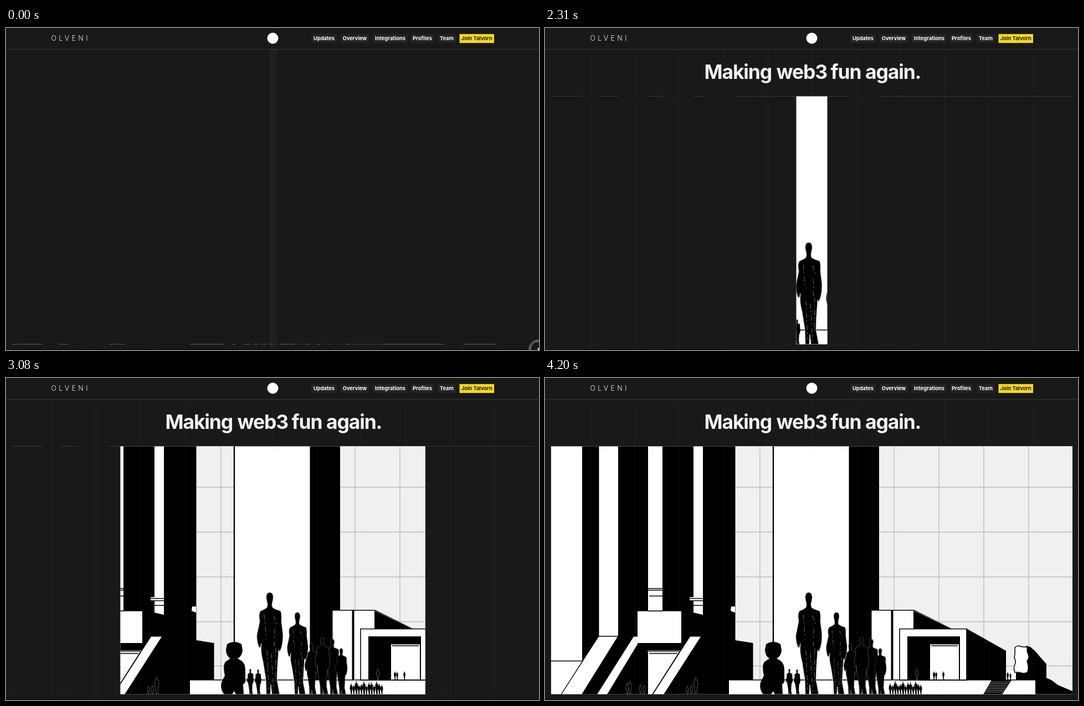
Recreate the animation shown at these times as an HTML page. Size 962 px wide and 582 px high, loop 4270 ms.

```html
<!DOCTYPE html>
<html lang="en">
<head>
<meta charset="utf-8">
<title>Making web3 fun again</title>
<style>
  html, body { margin: 0; width: 100%; height: 100%; overflow: hidden; background: #191919; }
  svg { display: block; width: 962px; height: 582px; font-family: Inter, sans-serif; }
  .nav { font-size: 9.3px; font-weight: 650; fill: #fff; text-anchor: middle; }
  .title { font-size: 35.5px; font-weight: 660; letter-spacing: -1.15px; fill: #f2f2f2; }
  .mark { font-size: 12.4px; font-weight: 300; letter-spacing: 4.4px; fill: #eee; }
</style>
</head>
<body>
<svg viewBox="0 0 962 582">
  <defs>
    <clipPath id="reveal"><rect id="window" y="123.5" height="448"/></clipPath>
    <clipPath id="topRow"><rect x="11" y="123" width="941" height="1"/></clipPath>
    <clipPath id="bottomRow"><rect x="11" y="571" width="941" height="1"/></clipPath>

    <path id="person" d="M0 0C5 0 7 5 6 12L4 22L5 27Q10 31 19 33Q22 36 21 52L24 76Q24 96 18 107L16 104L14 132L13 157L18 184H4L2 166L1 184H-6L-7 157L-12 125Q-17 108-15 92L-17 100L-20 98Q-24 85-23 76L-18 52Q-21 38-16 33Q-9 31-5 27L-4 22L-6 12C-7 5-5 0 0 0Z"/>
    <path id="scratches" fill="none" stroke="#888" stroke-width=".8" stroke-dasharray="9 4 3 6"
      d="M-10 40L-6 85M7 42L13 60M9 66L8 100M-5 105L-2 175M3 110L7 178M11 100L10 160"/>

    <g id="scene">
      <path fill="#fff" d="M11 123H952V572H11Z"/>
      <!-- tiled walls -->
      <path fill="#f0f0f0" d="M343 123H411V546H343ZM603 123H952V572H603Z"/>
      <path fill="none" stroke="#bcbcbc" stroke-width="1.4"
        d="M388 123V546M630 123V546M711 123V546M792 123V546M873 123V546M343 197.5H411M343 278.5H411M343 359.5H411M343 440.5H411M343 520.5H411M603 197.5H952M603 278.5H952M603 359.5H952M603 440.5H952M603 520.5H952"/>
      <!-- pillars and the dark mass on the left -->
      <path d="M67 123H97.500V466H132V123H186V421H212V123H268V424L285 428V123H343.500V474L375.500 479V546H332V572H29L67 512ZM410.800 123H413.200V546H410.800ZM548.500 123H603V546H548.500Z"/>
      <path fill="#fff" d="M97 467.500H131L66 572H29.500ZM160 467.500H167V481L112 572H94ZM167 421.500H246V479H167ZM186 495H242L193 572H186ZM262 467.500H281L214 572H195ZM261 396H285V411H268V402H261ZM343 413H336L335 421L343 424Z"/>
      <path fill="none" stroke="#fff" d="M185 493.500H244"/>
      <path fill="none" stroke="#000" stroke-width="1.3" d="M11 511.500H68L29 572M186 380.500H212M186 383.500H212M188 394H212M186 421H212M261 398.500H285M261 402.500H285M268 411H285M188 498H239"/>
      <!-- right-hand buildings -->
      <path fill="#fff" d="M332 546H885V572H332ZM589.500 420H665V546H589.500ZM832 530H850V572H832Z"/>
      <path d="M589 419H666L735 453H761L832 493V546H761V466L665 420.500H589ZM624.500 420H628.500V546H624.500ZM665 420V453H735Z"/>
      <path fill="#fff" stroke="#000" stroke-width="1.6" d="M640 546V453.500H761V546Z"/>
      <path d="M654 467H749V546H654Z"/>
      <path fill="#fff" d="M695 481.500H747V546H695Z"/>
      <path fill="none" stroke="#000" d="M697 484H745M332 545.800H890" stroke-width="1.4"/>
      <path d="M806 546H842L825 572H791Z"/>
      <path fill="none" stroke="#aaa" stroke-width=".8" d="M805 549.500H838M803 552.500H836M801 555.500H834M799 558.500H832M798 561.500H831M796 564.500H829M794 567.500H827"/>
      <path d="M868 484L876 486L884 493L891 501L905 517V542L914 546L926 555L952 566V572H885V546H850V533H868Z"/>
      <path fill="#fff" stroke="#000" stroke-width="1.5" d="M848 487Q853 483 858 485T871 486Q869 493 872 499T870 512Q874 521 871 532Q865 535 859 533T848 532Q845 524 848 518T847 506Q849 496 848 487Z"/>
      <path fill="#fff" d="M854 547H884V572H854Z"/>
      <g id="people"></g>
      <path d="M399 481Q412 473 425 481L427 492Q426 503 418 507L425 511Q432 516 432 528V550L428 554L429 572H415L412 566L408 572H394Q386 562 389 550L395 538Q391 520 396 513L405 507Q397 502 397 491Z"/>
    </g>
  </defs>

  <use id="topEdge" href="#scene" clip-path="url(#topRow)"/>
  <use id="bottomEdge" href="#scene" clip-path="url(#bottomRow)"/>
  <use href="#scene" clip-path="url(#reveal)"/>
  <g id="columns" fill="#e6e6e6"></g>

  <path fill="#363636" d="M0 38H962V39H0Z"/>
  <path fill="#101010" d="M0 580H962V582H0Z"/>
  <text class="mark" x="81.500" y="23">OLVENI</text>
  <circle cx="481.500" cy="18.500" r="10" fill="#fff"/>
  <g id="nav" class="nav"></g>
  <text id="title" class="title" y="91.500"><tspan x="287.500">Making</tspan><tspan x="417.500">web3</tspan><tspan x="515.500">fun</tspan><tspan x="578">again.</tspan></text>

  <g id="ring" fill="none">
    <circle cx="960" cy="580" r="16" stroke="#999"/>
    <circle cx="960" cy="580" r="13.500" stroke="#ccc"/>
  </g>
  <path id="pointer" fill="#fff" d="M959 578L964 580L961 583Z"/>
</svg>

<script>
const $ = id => document.getElementById(id);
const LOOP = 4270, TICK = 70, CENTER = 481.5;

function add(parent, name, attrs, text = '') {
  const node = document.createElementNS('http://www.w3.org/2000/svg', name);
  for (const key in attrs) node.setAttribute(key, attrs[key]);
  node.textContent = text;
  parent.append(node);
  return node;
}

function person(x, top, height, outline = 'none', scratched = false) {
  const scale = height / 184;
  const transform = `translate(${x} ${top}) scale(${scale})`;
  add($('people'), 'use', { href: '#person', transform, stroke: outline, 'stroke-width': .8 / scale });
  if (scratched) add($('people'), 'use', { href: '#scratches', transform });
}

[[551, 480, 92], [589, 472, 100], [571, 468, 104]].forEach(p => person(...p, '#555'));
person(605, 489, 83, '#333');
person(476, 387.5, 184.5, '#ddd', true);
person(526, 423.5, 148.5, '#ddd', true);
[[441, 526, 46], [455, 527, 45], [702, 530, 15], [706, 531, 14], [719, 530, 15],
 [835, 531, 15], [840, 533, 13], [852, 532, 14], [862, 533, 13]].forEach(p => person(...p));
[[671, 526, 20], [148, 551, 21], [153, 548, 24], [172, 554, 18], [179, 556, 16],
 [257, 557, 15], [264, 556, 16], [272, 541, 31]].forEach(p => person(...p, '#666'));
for (let i = 0; i < 13; i++) {
  const top = 552 + 4 * Math.sin(i * 2.3);
  person(623 + i * 4.6, top, 572 - top);
}

[['Updates', 551, 597], ['Overview', 604, 655], ['Integrations', 662, 725],
 ['Profiles', 731, 772], ['Team', 779, 812], ['Join Talvorn', 818.5, 881]].forEach(([label, left, right], i) => {
  const accent = i === 5;
  add($('nav'), 'rect', { x: left, y: 11, width: right - left, height: 16, fill: accent ? '#ffdb0a' : '#232323' });
  add($('nav'), 'text', { x: (left + right) / 2, y: 22, fill: accent ? '#191919' : '#fff' }, label);
});

const columns = Array.from({ length: 11 }, () =>
  add($('columns'), 'rect', { y: 39, width: 1, height: 541 }));

const progress = (t, start, end) => Math.min(1, Math.max(0, (t - start) / (end - start)));
const easeOut = p => 1 - (1 - p) ** 3;
const easeInOut = p => (1 - Math.cos(Math.PI * p)) / 2;
const mix = (a, b, p) => a + (b - a) * p;

function render(t) {
  const settle = easeOut(progress(t, 910, 1750));
  const spacing = mix(1.2, 76.65, easeOut(progress(t, 0, 140))) + 3.25 * settle;
  columns.forEach((column, i) => column.setAttribute('x', CENTER + (i - 5) * spacing));
  $('columns').setAttribute('fill-opacity', t < TICK ? .045 : mix(.075, .048, settle));

  const fade = progress(t, 910, 1610);
  $('title').setAttribute('opacity', fade);
  $('topEdge').setAttribute('opacity', t < TICK ? 0 : .13);
  $('bottomEdge').setAttribute('opacity', mix(t < TICK ? .28 : .15, .015, fade));

  const half = 470.5 * easeInOut(progress(t, 2006, 3944));
  $('window').setAttribute('x', CENTER - half);
  $('window').setAttribute('width', 2 * half);

  $('ring').setAttribute('transform', `translate(${t / 7} ${t / 7})`);
  $('ring').setAttribute('opacity', t < 140 ? 1 : 0);
  $('pointer').setAttribute('opacity', t < 840 ? 1 : 0);
}

function loop() {
  const t = performance.now() % LOOP;
  render(Math.floor(t / TICK) * TICK);
  requestAnimationFrame(loop);
}
loop();
</script>
</body>
</html>
```
